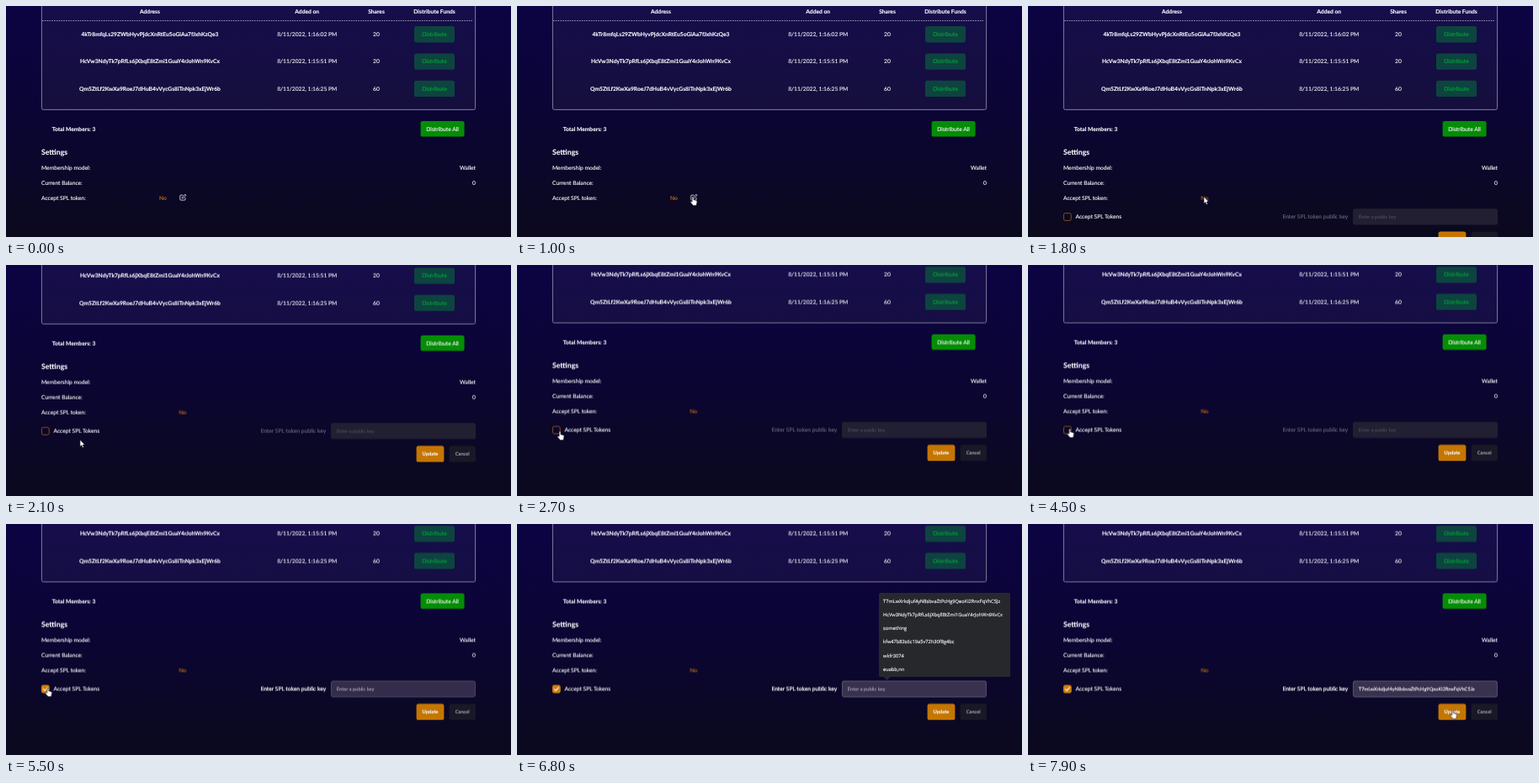
An HTML page for the animation above (8000 ms loop, 600 by 275 pixels).

```html
<!DOCTYPE html>
<html lang="en">
<head>
<meta charset="utf-8">
<title>Member settings</title>
<style>
html, body { margin: 0; width: 100%; height: 100%; overflow: hidden; background: #0b0a1e; }
svg { display: block; width: 600px; height: 275px; }
text {
  font: 6.7px Lato, "Open Sans", sans-serif;
  color: #f8f7fb; fill: currentColor; stroke: currentColor; stroke-width: .13;
  text-rendering: geometricPrecision; white-space: pre;
}
.b { font-weight: 700; }
.mid { text-anchor: middle; }
.end { text-anchor: end; }
.title { font-size: 8.7px; font-weight: 700; }
.small { font-size: 5.75px; }
.list text { font: 5.7px "Open Sans", "Noto Sans", sans-serif; }

/* One loop is 8 s, so 1% is 80 ms. */
.page, .icon, .no, .panel, .on, .focus, .list, .empty, .filled, .caret, .cursor, .arrow, .hand {
  animation: 8s linear infinite;
}
.page { animation-name: scroll; }
.icon { animation-name: icon; }
.no { animation-name: no; }
.panel { animation-name: panel; }
.on { animation-name: check; }
.focus { animation-name: focus; }
.list { animation-name: list; }
.empty { animation-name: empty; }
.filled { animation-name: filled; }
.caret { animation-name: caret; }
.cursor { animation-name: move; }
.arrow { animation-name: arrow; }
.hand { animation-name: hand; }
.icon, .no, .focus, .list, .empty, .filled, .caret, .arrow, .hand { animation-timing-function: step-end; }

@keyframes scroll {
  0%, 23.8% { transform: translateY(0); }
  25% { transform: translateY(-40px); }
  26.25% { transform: translateY(-53.3px); }
  27.5%, 100% { transform: translateY(-54.5px); }
}
@keyframes icon { 0% { opacity: 1; } 17.5%, 100% { opacity: 0; } }
@keyframes no { 0% { transform: none; } 17.5%, 100% { transform: translateX(23.4px); } }
@keyframes panel { 0%, 16.9% { opacity: 0; } 19.5%, 100% { opacity: 1; } }
@keyframes check {
  0%, 43.1% { opacity: 0; }
  44.8%, 54.4% { opacity: 1; }
  56.1%, 61.9% { opacity: 0; }
  63.6%, 100% { opacity: 1; }
}
@keyframes focus { 0% { opacity: 0; } 78.75%, 100% { opacity: 1; } }
@keyframes list { 0% { opacity: 0; } 78.75% { opacity: 1; } 91.25%, 100% { opacity: 0; } }
@keyframes empty { 0% { opacity: 1; } 91.25%, 100% { opacity: 0; } }
@keyframes filled { 0% { opacity: 0; } 91.25%, 100% { opacity: 1; } }
@keyframes caret { 0% { opacity: 0; } 78.75% { opacity: 1; } 85%, 100% { opacity: 0; } }
@keyframes move {
  0%, 1.25% { transform: translate(300px, 190px); }
  5% { transform: translate(240px, 212px); }
  11.25%, 23.8% { transform: translate(209px, 227px); }
  25% { transform: translate(140px, 214px); }
  26.25% { transform: translate(88px, 208px); }
  30% { transform: translate(60px, 201px); }
  35%, 37.5% { transform: translate(48px, 197px); }
  38.75%, 74.4% { transform: translate(49.6px, 195px); }
  76.9%, 87% { transform: translate(415px, 196px); }
  89.4%, 91.25% { transform: translate(470px, 92px); }
  96.5% { transform: translate(506px, 218px); }
  98.75%, 100% { transform: translate(504.6px, 221.5px); }
}
@keyframes arrow {
  0% { opacity: 0; }
  1.25% { opacity: 1; }
  10.5% { opacity: 0; }
  17.5% { opacity: 1; }
  33.75% { opacity: 0; }
  74.5% { opacity: 1; }
  77% { opacity: 0; }
  87.5% { opacity: 1; }
  96%, 100% { opacity: 0; }
}
@keyframes hand {
  0% { opacity: 0; }
  10.5% { opacity: 1; }
  17.5% { opacity: 0; }
  33.75% { opacity: 1; }
  74.5% { opacity: 0; }
  96%, 100% { opacity: 1; }
}
</style>
</head>
<body>
<svg viewBox="0 0 600 275">
  <defs>
    <linearGradient id="sky" x2="0" y2="1">
      <stop stop-color="#0c0343"/>
      <stop offset=".5" stop-color="#0b0533"/>
      <stop offset="1" stop-color="#0b091d"/>
    </linearGradient>
    <g id="pay">
      <rect x="485" y="-9.6" width="48" height="19.4" rx="2.6" fill="#0d443f"/>
      <text class="mid" x="509" y="2.3" style="color:#05a33b">Distribute</text>
    </g>
  </defs>

  <rect width="600" height="275" fill="url(#sky)"/>

  <g class="page">
    <rect x="42.4" y="-20" width="515.2" height="143.4" rx="2" fill="#fff" fill-opacity=".045" stroke="#8e8aa8" stroke-width=".9"/>
    <path d="M43 17.5H554" stroke="#c9c7d6" stroke-width=".7" stroke-dasharray="1.7 1.1"/>
    <g class="mid b">
      <text class="b" x="171" y="8.8">Address</text>
      <text class="b" x="357.7" y="8.8">Added on</text>
      <text class="b" x="440" y="8.8">Shares</text>
      <text class="b" x="509" y="8.8">Distribute Funds</text>
    </g>
    <g class="mid" transform="translate(0 33.6)">
      <text class="b" x="171" y="2.3">4kTr8mfqLs29ZWbHyvPjdcXnRtEu5oGiAa7fJxhKzQe3</text>
      <text x="357.7" y="2.3">8/11/2022, 1:16:02 PM</text>
      <text x="440" y="2.3">20</text>
      <use href="#pay"/>
    </g>
    <g class="mid" transform="translate(0 66)">
      <text class="b" x="171" y="2.3">HcVw3NdyTk7pRfLs6jXbqE8tZmi1GuaY4rJohWn9KvCx</text>
      <text x="357.7" y="2.3">8/11/2022, 1:15:51 PM</text>
      <text x="440" y="2.3">20</text>
      <use href="#pay"/>
    </g>
    <g class="mid" transform="translate(0 98.3)">
      <text class="b" x="171" y="2.3">Qm5ZtLf2KwXa9RoeJ7dHuB4vVycGs8iTnNpk3xEjWr6b</text>
      <text x="357.7" y="2.3">8/11/2022, 1:16:25 PM</text>
      <text x="440" y="2.3">60</text>
      <use href="#pay"/>
    </g>

    <text class="b" x="54.8" y="148.5">Total Members: 3</text>
    <rect x="492.6" y="137" width="52" height="18.6" rx="2.6" fill="#048d05"/>
    <text class="mid" x="518.6" y="148.5">Distribute All</text>

    <text class="title" x="42" y="177.3">Settings</text>
    <text x="42" y="195.1">Membership model:</text>
    <text class="end" x="558" y="195.1">Wallet</text>
    <text x="42" y="213">Current Balance:</text>
    <text class="end" x="557.8" y="213">0</text>
    <text x="42" y="230.5">Accept SPL token:</text>
    <text class="no" x="182" y="230.5" style="color:#c66c18">No</text>
    <path class="icon" d="M210.2 225.1h-2.6q-.8 0-.8.8v4.4q0 .8.8.8h4.6q.8 0 .8-.8v-2.2M209.2 228.9l.3-1.5 3.3-3.3 1.2 1.2-3.3 3.3z" fill="none" stroke="#f0eff5" stroke-width=".8" stroke-linejoin="round"/>

    <g class="panel">
      <rect x="42.4" y="246.6" width="8.8" height="8.8" rx="2" fill="none" stroke="#96591f" stroke-width=".9"/>
      <g class="on">
        <rect x="42" y="246.2" width="9.6" height="9.6" rx="2.2" fill="#cf7f0c"/>
        <path d="M44.4 251.2l1.7 1.7 3.3-3.7" fill="none" stroke="#fff" stroke-width="1.1" stroke-linecap="round" stroke-linejoin="round"/>
      </g>
      <text x="56.5" y="253.3">Accept SPL Tokens</text>

      <text x="302.4" y="253.3" style="color:#686579">Enter SPL token public key</text>
      <rect x="386" y="241.2" width="172" height="19.4" rx="2.6" fill="#211f31"/>
      <text class="small empty" x="392.8" y="253" style="color:#4d4b5c">Enter a public key</text>
      <g class="on">
        <text x="302.4" y="253.3">Enter SPL token public key</text>
        <rect x="386.4" y="241.6" width="171.2" height="18.6" rx="2.4" fill="#332d4b" stroke="#575170" stroke-width=".8"/>
        <rect class="focus" x="386.4" y="241.6" width="171.2" height="18.6" rx="2.4" fill="#38324f" stroke="#5e5877" stroke-width=".8"/>
        <text class="small empty" x="392.8" y="253" style="color:#a5a2b4">Enter a public key</text>
        <text class="small filled" x="392.8" y="253">T7mLwXrkdjuf4yN8sbvaZtPcHg9QeoKi2RnxFqVhC5Jz</text>
        <path class="caret" d="M392.6 247.2v7" stroke="#fff" stroke-width=".6"/>
      </g>

      <rect x="487.6" y="268.6" width="32.8" height="19.4" rx="2.6" fill="#c57602"/>
      <text class="small b mid" x="504" y="280.3">Update</text>
      <rect x="526.6" y="268.6" width="31.4" height="19.4" rx="2.6" fill="#191826"/>
      <text class="small mid" x="542.2" y="280.3" style="color:#b5b3c0">Cancel</text>
    </g>
  </g>

  <g class="list">
    <path d="M431.5 82H584.5q1.5 0 1.5 1.5V180.5q0 1.5-1.5 1.5H443.5l-4 4-4-4h-4q-1.5 0-1.5-1.5V83.5q0-1.5 1.5-1.5z" fill="#27282c"/>
    <text x="435" y="94">T7mLwXrkdjuf4yN8sbvaZtPcHg9QeoKi2RnxFqVhC5Jz</text>
    <text x="435" y="110.2">HcVw3NdyTk7pRfLs6jXbqE8tZmi1GuaY4rJohWn9KvCx</text>
    <text x="435" y="126.3">something</text>
    <text x="435" y="142.4">kfw47b83s6c19a5v72h30f8g4bc</text>
    <text x="435" y="158.5">wkfr3074</text>
    <text x="435" y="174.6">euabb,nn</text>
  </g>

  <g class="cursor" fill="#fff" stroke="#15131f" stroke-width=".6" stroke-linejoin="round">
    <path class="arrow" d="M0 0V8.2L1.8 6.6 3 9.4 4.4 8.8 3.2 6.1H5.6z"/>
    <path class="hand" d="M-.9 6.2V.8a.9.9 0 0 1 1.8 0V3.7l3 .7q1.2.3 1.1 1.5L4.5 8.6 4 10.4H.3L-2.6 6.9q-.6-1 .1-1.4.8-.2 1.6.7z"/>
  </g>
</svg>
</body>
</html>
```
